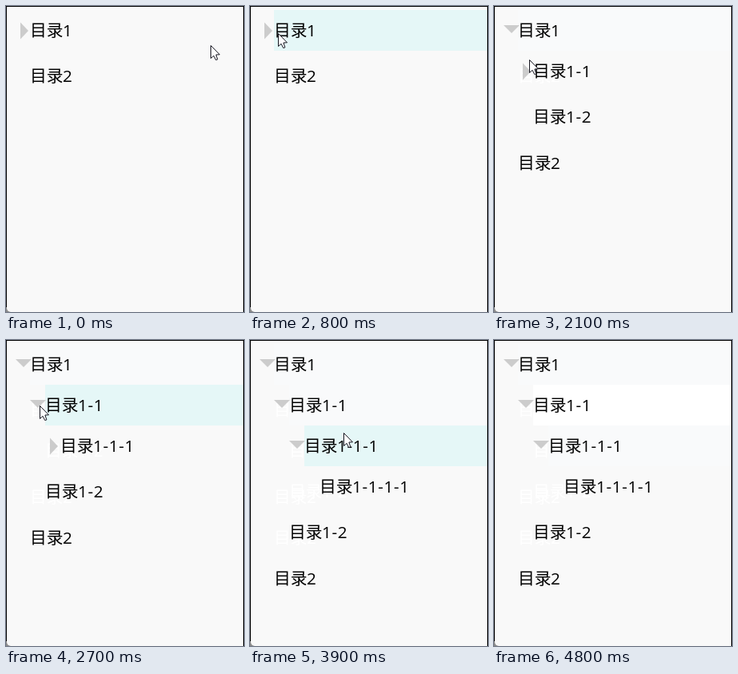
Write an HTML page with a canvas that moves like this. It is 298 px wide and 383 px high and loops after 4900 ms.

```html
<!DOCTYPE html>
<html lang="zh">
<head>
<meta charset="utf-8">
<style>
html, body { margin: 0; width: 100%; height: 100%; overflow: hidden; background: #f9f9f9; }
canvas { display: block; }
</style>
</head>
<body>
<canvas id="stage" width="298" height="383"></canvas>
<script>
const ctx = document.getElementById('stage').getContext('2d', { alpha: false });
const W = 298, H = 383, LOOP = 4900, STEP = 100;
const BG = '#f9f9f9', WASH = '#f9fafb', HOVER = '#e5f7f7', ARROW = '#ccc';
const CJK = '350 20.8px "Noto Sans CJK SC", "Noto Sans CJK", sans-serif';
const LATIN = '20.8px "Open Sans", "Noto Sans", sans-serif';

const OPEN = [1500, 2700, 3600];   // each level unfolds
const LEFT = [2000, 2900, 4000];   // pointer first leaves each row
const POINTER_OUT = 4300;

const HOME = { x: 256, y: 49 };
const moves = [
  { from: 0, to: 600, x: 38, y: 34 },
  { from: 600, to: 800, x: 35, y: 34 },
  { from: 800, to: 1000, x: 22, y: 30 },
  { from: 1800, to: 2100, x: 44, y: 67 },
  { from: 2100, to: 2300, x: 42, y: 82 },
  { from: 2800, to: 3100, x: 61, y: 129 },
  { from: 3800, to: 4100, x: 277, y: 77 },
  { from: 4100, to: 4300, x: 292, y: 60 }
];

const indent = level => 30 + 18.7 * level;
const rowMid = level => 31 + 51 * level;

function pointerAt(t) {
  let { x, y } = HOME;
  for (const m of moves) {
    const u = Math.min(1, Math.max(0, (t - m.from) / (m.to - m.from)));
    const k = u * u * (3 - 2 * u);
    x += (m.x - x) * k;
    y += (m.y - y) * k;
  }
  return { x: Math.round(x), y: Math.round(y) };
}

function isHovered(level, p) {
  const dy = Math.abs(p.y - rowMid(level));
  const onRow = p.x >= indent(level) && dy <= 25;
  const onArrow = p.x >= indent(level) - 18 && p.x < indent(level) && dy < 10.5;
  return onRow || onArrow;
}

function rect(color, x, y, w, h) {
  ctx.fillStyle = color;
  ctx.fillRect(x, y, w, h);
}

function shape(points, color) {
  ctx.beginPath();
  points.forEach(([x, y]) => ctx.lineTo(x, y));
  ctx.closePath();
  ctx.fillStyle = color;
  ctx.fill();
}

function label(num, level, mid, color) {
  const x = Math.ceil(indent(level));
  ctx.fillStyle = color;
  ctx.font = CJK;
  ctx.letterSpacing = '0px';
  ctx.fillText('目录', x, mid + 7);
  ctx.font = LATIN;
  ctx.letterSpacing = '0.6px';
  ctx.fillText(num, x + 41, mid + 7);
}

function arrow(level, mid, open) {
  const x = Math.floor(indent(level));
  shape(open
    ? [[x - 18, mid - 7], [x + 2, mid - 7], [x - 8, mid + 3]]
    : [[x - 12, mid - 10.5], [x - 2, mid], [x - 12, mid + 10.5]], ARROW);
}

function rowFill(level, color) {
  const x = Math.ceil(indent(level));
  rect(color, x, rowMid(level) - 26, W - 1 - x, 51);
}

// Labels below the unfolded branch
function tail(depth, color) {
  let mid = rowMid(depth) + 57;
  if (depth) {
    label('1-2', 1, mid, color);
    mid += 58;
  }
  label('2', 0, mid, color);
}

function branch(depth) {
  for (let i = 0; i <= depth; i++) {
    label('1' + '-1'.repeat(i), i, rowMid(i), '#000');
    if (i < OPEN.length) arrow(i, rowMid(i), i < depth);
  }
}

function pointer(p) {
  ctx.save();
  ctx.translate(p.x + 0.5, p.y + 0.5);
  shape([[0, 0], [0, 16], [3.6, 12.8], [6.2, 18], [8.4, 17.4], [6.4, 11.5], [11, 11.3]], '#fff');
  ctx.strokeStyle = '#15151f';
  ctx.stroke();
  ctx.restore();
}

function frame() {
  rect('#000', 0, 0, W, H);
  rect('#8a8a8a', 0, H - 6, 6, 6);
  ctx.beginPath();
  ctx.roundRect(1, 1, W - 2, H - 1, [0, 0, 0, 5]);
  ctx.fillStyle = BG;
  ctx.fill();
}

function draw(t) {
  const depth = OPEN.filter(at => t >= at).length;
  const p = pointerAt(t);
  const inside = t < POINTER_OUT;

  frame();
  // Moved labels leave pale traces
  for (let d = 0; d < depth; d++) tail(d, '#fff');
  LEFT.forEach((at, level) => {
    if (t >= at) rowFill(level, WASH);
    if (inside && t >= STEP && level <= depth && isHovered(level, p)) rowFill(level, HOVER);
  });
  if (!inside) rowFill(1, '#fff');

  branch(depth);
  tail(depth, '#000');
  if (inside) pointer(p);
}

const start = performance.now();
function tick() {
  const t = (performance.now() - start) % LOOP;
  draw(Math.floor(t / STEP) * STEP);
  requestAnimationFrame(tick);
}
tick();
</script>
</body>
</html>
```
